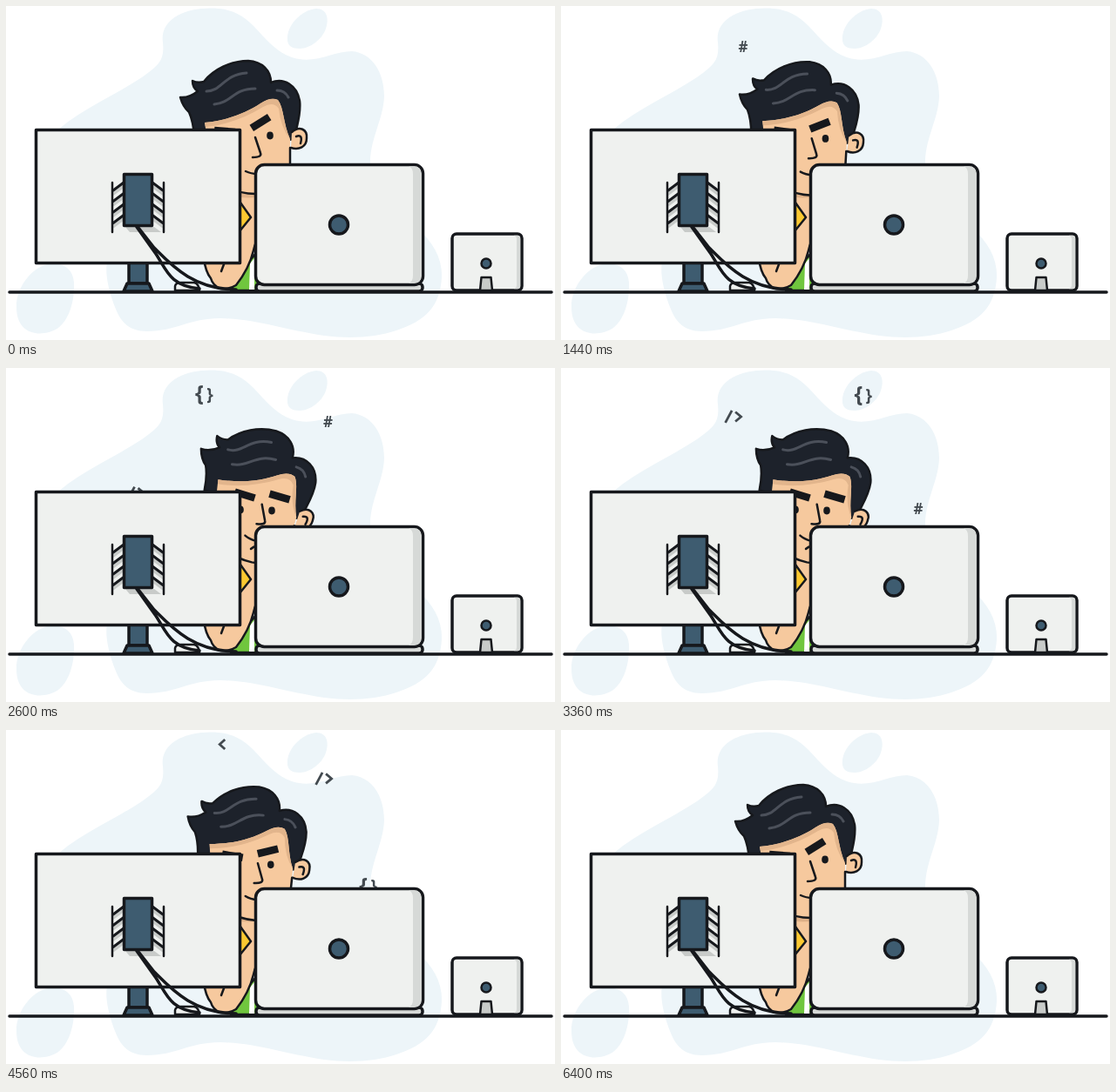
These frames come from a looping animation (630x384 px, 6.64 s). An HTML page:

```html
<!DOCTYPE html>
<html lang="en">
<head>
<meta charset="utf-8">
<title>Coder at the desk</title>
<style>
html, body { margin: 0; width: 630px; height: 384px; overflow: hidden; background: #fff; }
svg { display: block; }
.ink { stroke: #16181c; stroke-width: 3.5; stroke-linejoin: round; stroke-linecap: round; }
.thin { stroke-width: 2.5; }
.open { fill: none; }
.paper { fill: #eff1ef; }
.shade { fill: #d6d9d7; }
.steel { fill: #3e5c70; }
.skin { fill: #f6c99e; }
.dark { fill: #16181c; }
.mist { fill: #edf5f9; }
.shine { fill: none; stroke: #4b505a; stroke-width: 3; stroke-linecap: round; }
.code { fill: #434a50; font: bold 17px "Open Sans", sans-serif; text-anchor: middle; }
.code path { fill: none; stroke: #434a50; stroke-width: 2.8; }
.code .big { font-size: 25px; }
.code .small { font-size: 19px; }
</style>
</head>
<body>
<svg width="630" height="384" viewBox="0 0 630 384">
  <!-- backdrop -->
  <g class="mist">
    <path d="M180 42C176 12 212 0 244 3C287 7 291 45 328 59C354 68 375 52 397 52C420 54 434 76 434 104C433 130 419 150 418 178C418 218 440 228 467 251C490 270 501 290 500 312C498 345 482 362 448 373C425 381 395 383 365 379C318 372 288 360 246 359C210 359 195 374 162 374C134 374 128 355 121 335C116 318 114 305 116 294L60 142C88 118 126 102 156 82C176 68 182 62 180 42Z"/>
    <path d="M323 40C321 22 340 4 356 3C368 3 371 14 367 26C363 38 349 49 337 49C328 49 324 46 323 40Z"/>
    <path d="M12 346C11 326 28 301 48 297C66 294 77 302 78 318C79 338 73 360 60 370C44 381 12 381 12 346Z"/>
  </g>

  <!-- body -->
  <g class="ink thin">
    <path d="M258 327Q268 303 291 280V327Z" fill="#70c63e"/>
    <path d="M280 296L285 290V326H279Z" fill="#fff" stroke="none"/>
    <path class="skin" d="M262 200H292V262Q287 268 284 281Q279 302 264 321Q256 326 246 325Q237 321 235 313Q229 306 227 290Z"/>
    <path d="M266 214H290V219Q278 222 266 219Z" fill="#dfb188" stroke="none"/>
    <path d="M264 219L281 243L268 259Z" fill="#fcc931"/>
    <path class="open" d="M247 305L250 297"/>
  </g>

  <!-- head -->
  <g id="head">
    <path class="ink thin" fill="#1d222b" d="M216 150Q215 133 210 122Q203 116 200 105Q210 106 220 98Q214 94 214 86Q220 89 227 87C238 73 258 63 278 63C294 64 304 74 304 88C319 82 334 91 337 109C339 126 333 138 331 153L323 154Z"/>
    <path class="ink thin skin" d="M328 145C337 137 346 142 345 152C345 162 336 166 327 163"/>
    <path class="ink thin open" d="M333 150Q341 147 338 158"/>
    <path class="skin" d="M232 160L228 134C256 131 275 123 292 112Q304 104 312 108C319 117 318 135 326 153V184Q322 213 290 216Q260 217 243 198Z"/>
    <path d="M228 134C256 131 275 123 292 112Q304 104 312 108C319 117 318 135 326 153Q315 139 313 118Q307 109 295 116C272 130 250 137 229 139Z" fill="#e2b58c"/>
    <path class="ink thin open" d="M326 163V184Q322 213 290 216Q260 217 243 198"/>
    <path class="shine" d="M230 98C248 98 249 79 276 77M239 113C259 111 261 95 286 95M311 97Q320 97 324 105"/>
  </g>
  <g id="face">
    <rect id="browL" class="dark" x="-12" y="-4.3" width="24" height="8.6"/>
    <rect id="browR" class="dark" x="-12" y="-4.3" width="24" height="8.6"/>
    <ellipse id="eyeL" class="dark" rx="3.8" ry="4.4"/>
    <ellipse id="eyeR" class="dark" rx="3.8" ry="4.4"/>
    <path id="nose" class="ink thin open" d="M-2 -12L4 6Q6 11 -5 11"/>
    <path id="mouth" class="ink thin open" d="M-6 -1Q0 2 8 2"/>
    <path id="lip" class="ink thin open" d="M-3 2Q0 -1 4 -1"/>
  </g>

  <!-- flying code -->
  <g class="code">
    <g class="sign"><text y="6">#</text></g>
    <g class="sign"><text class="big" x="-6" y="6.5">{</text><text class="small" x="6" y="5">}</text></g>
    <g class="sign"><path d="M-10 6.5L-2.5 -7.5M1.5 -6L8 -0.5L1.5 5"/></g>
    <g class="sign"><path d="M3 -4L-3 1.5L3 7"/></g>
  </g>

  <!-- desk -->
  <g class="ink">
    <path class="paper thin" d="M194 327V322Q195 318 200 318H216Q221 319 222 327Z"/>
    <rect class="steel" x="141" y="290" width="21" height="29"/>
    <path class="steel" d="M139 319H164L168 328H135Z"/>
    <rect class="paper" x="34.5" y="142.5" width="234" height="153"/>
    <path d="M137 254H170L178 260H142Z" fill="#c8cbc9" stroke="none"/>
    <g id="struts" class="open"></g>
    <path class="open thin" d="M122 203V260M181 203V260"/>
    <rect class="steel" x="135.5" y="193.5" width="32" height="59"/>
    <path class="open" d="M150 254L172 285C184 303 188 322 222 325M152 255L170 278C190 298 215 326 264 326"/>
    <rect class="shade" x="287" y="319" width="191" height="9" rx="4"/>
    <rect class="paper" x="286.5" y="182.5" width="192" height="138" rx="10"/>
    <path class="shade" stroke="none" d="M462 184.3H468Q476.7 184.3 476.7 193V310Q476.7 318.8 468 318.8H462Q467 317 467 310V193Q467 186 462 184.3Z"/>
    <circle class="steel" cx="382" cy="251.5" r="10.5"/>
    <rect class="paper" x="512" y="262" width="80" height="65" rx="5"/>
    <path class="shade" stroke="none" d="M583 263.8H587Q590.2 264 590.2 268V322Q590 325 587 325.2H583Q586 324 586 321V268Q586 265 583 263.8Z"/>
    <circle class="steel thin" cx="551" cy="296" r="5.5"/>
    <path class="thin" fill="#c8cbc9" d="M544 327L545.5 312H556.5L558 327Z"/>
    <path class="open" d="M4 329H626"/>
  </g>
</svg>
<script>
const LOOP = 6640, STEP = 40;
const $ = id => document.getElementById(id);
const signs = document.querySelectorAll('.sign');
const delays = [0, 1010, 2005, 2810];

// time, x, y along the arc over the head
const arc = [
  [540, 148, 150], [780, 157, 124], [1000, 168, 99], [1200, 183, 74],
  [1350, 198, 57], [1740, 247, 16], [1810, 256, 10], [2040, 295, 6],
  [2340, 346, 32], [2560, 366, 57], [2730, 379, 79], [3200, 404, 140],
  [3360, 410, 162], [3540, 416, 180], [3640, 418, 194]
];

// cubic through the points, with slopes taken from the neighbours
function along(t) {
  const last = arc.length - 1;
  if (t < arc[0][0] || t > arc[last][0]) return null;
  let i = 0;
  while (i < last - 1 && t > arc[i + 1][0]) i++;
  const a = arc[i], b = arc[i + 1], span = b[0] - a[0], u = (t - a[0]) / span;
  const slope = (k, axis) => {
    const p = arc[Math.max(k - 1, 0)], q = arc[Math.min(k + 1, last)];
    return (q[axis] - p[axis]) / (q[0] - p[0]) * span;
  };
  return [1, 2].map(n =>
    a[n] * (1 + 2 * u) * (1 - u) ** 2 + slope(i, n) * u * (1 - u) ** 2 +
    b[n] * u * u * (3 - 2 * u) + slope(i + 1, n) * u * u * (u - 1));
}

const ease = (t, from, to) => {
  const u = Math.min(1, Math.max(0, (t - from) / (to - from)));
  return u * u * (3 - 2 * u);
};

// resting and tilted pose of each feature: x, y, angle
const poses = {
  browL: [[251, 144, 5], [274, 146, 17]],
  browR: [[292, 134, -32], [314, 148, 16]],
  eyeL: [[256, 156, 0], [269, 163, 0]],
  eyeR: [[303, 149, 0], [305, 164, 0]],
  nose: [[288, 163, 0], [294, 169, 8]],
  mouth: [[281, 191, 0], [280, 195, 14]],
  lip: [[298, 204, 0], [284, 206, 0]]
};

function place(el, x, y, angle = 0) {
  el.setAttribute('transform', `translate(${x} ${y}) rotate(${angle})`);
}

for (let i = 0; i < 4; i++) {
  const y = 203 + i * 12.5;
  const strut = (dy, style) =>
    `<path style="${style}" d="M135 ${y + dy}L123 ${y + 9 + dy}M168 ${y + dy}L180 ${y + 9 + dy}"/>`;
  $('struts').innerHTML += strut(4, 'stroke:#c8cbc9') + strut(0, 'stroke-width:3');
}

function draw(t) {
  const tilt = ease(t, 1280, 1800) - ease(t, 4260, 4780);
  $('head').setAttribute('transform',
    `translate(${-6 * tilt} ${5 * tilt}) rotate(${15 * tilt} 280 210)`);
  for (const id in poses) {
    const [a, b] = poses[id];
    place($(id), ...a.map((v, i) => v + (b[i] - v) * tilt));
  }
  signs.forEach((el, i) => {
    const spot = along(t - delays[i]);
    el.style.display = spot ? '' : 'none';
    if (spot) place(el, ...spot);
  });
}

const start = performance.now();
function tick() {
  const t = (performance.now() - start) % LOOP;
  draw(Math.floor(t / STEP) * STEP);
  requestAnimationFrame(tick);
}
tick();
</script>
</body>
</html>
```
